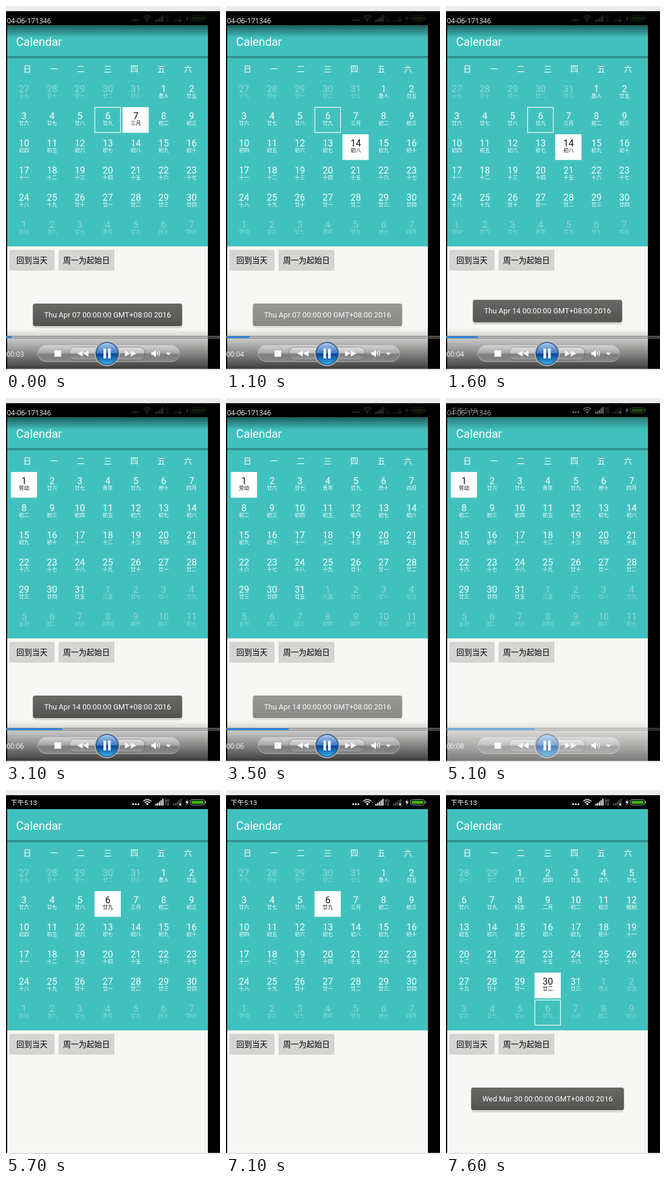
An HTML page for the animation above (8 s loop, 371 by 630 pixels).

```html
<!DOCTYPE html>
<html lang="zh-CN">
<head>
<meta charset="utf-8">
<style>
html, body { margin: 0; width: 100%; height: 100%; overflow: hidden; background: #000; }
svg { display: block; width: 371px; height: 630px; font-family: Roboto, "Noto Sans CJK SC", "Noto Sans CJK", sans-serif; }
.mid { text-anchor: middle; }
.player { font: 12px "Open Sans", sans-serif; fill: #fff; }
</style>
</head>
<body>
<svg viewBox="0 0 371 630">
  <defs>
    <linearGradient id="topShade" x2="0" y2="1">
      <stop offset="0" stop-opacity=".9"/><stop offset=".35" stop-opacity=".8"/>
      <stop offset=".55" stop-opacity=".5"/><stop offset="1" stop-opacity="0"/>
    </linearGradient>
    <linearGradient id="lowShade" x2="0" y2="1">
      <stop offset="0" stop-opacity="0"/><stop offset=".25" stop-opacity=".18"/><stop offset="1" stop-opacity=".75"/>
    </linearGradient>
    <linearGradient id="barFill" x2="0" y2="1">
      <stop offset="0" stop-color="#fff" stop-opacity=".45"/><stop offset=".48" stop-color="#fff" stop-opacity=".25"/>
      <stop offset=".52" stop-color="#777" stop-opacity=".35"/><stop offset="1" stop-color="#bbb" stop-opacity=".45"/>
    </linearGradient>
    <linearGradient id="ball" x2="0" y2="1">
      <stop offset="0" stop-color="#a9c8ec"/><stop offset=".48" stop-color="#3f7cc8"/>
      <stop offset=".52" stop-color="#0b3f94"/><stop offset="1" stop-color="#2fb4f0"/>
    </linearGradient>
    <linearGradient id="toastFill" x2="0" y2="1">
      <stop offset="0" stop-color="#686866"/><stop offset="1" stop-color="#545452"/>
    </linearGradient>
    <linearGradient id="drop" x2="0" y2="1">
      <stop offset="0" stop-opacity=".4"/><stop offset="1" stop-opacity="0"/>
    </linearGradient>
    <clipPath id="view"><rect x="2" y="88" width="348" height="328"/></clipPath>
  </defs>

  <rect width="371" height="9" fill="#ececec"/>
  <rect x="2" y="33" width="348" height="595" fill="#f7f7f5"/>
  <rect y="628" width="371" height="2" fill="#dfe0ea"/>

  <!-- status bar -->
  <g fill="#fff">
    <text x="8" y="25.5" font-size="11.7">下午5:13</text>
    <circle cx="220.5" cy="24.5" r="1.6"/><circle cx="225" cy="24.5" r="1.6"/><circle cx="229.500" cy="24.5" r="1.6"/>
    <path d="M238 19.500q7-6 14 0M240.500 22q4.500-4 9 0" fill="none" stroke="#fff" stroke-width="1.600"/>
    <path d="M242.500 23.800q2.500-2 5 0l-2.500 3z"/>
    <path id="bars" d="M259 24h2v3h-2zM262 22.500h2v4.500h-2zM265 20.500h2v6.500h-2zM268 18h2v9h-2zM271 15.500h2v11.500h-2z"/>
    <use href="#bars" x="31" opacity=".35"/>
    <path d="M300 23l4 4m0-4l-4 4" stroke="#fff" stroke-width="1"/>
    <g font-size="6.5" fill="#bbb"><text x="275" y="20.500">4G</text><text x="275" y="27">1X</text></g>
    <path d="M315 16l-4 6h2.500l-1.500 5 4.500-6.500h-2.500z"/>
    <rect x="319.500" y="16.500" width="25" height="9.500" rx="4" fill="none" stroke="#aaa"/>
    <rect x="321.500" y="18.500" width="21" height="5.500" rx="2.500" fill="#3fae14"/>
    <rect x="345" y="19.500" width="1.500" height="3.500" fill="#aaa"/>
  </g>

  <!-- app -->
  <rect x="2" y="33" width="348" height="383" fill="#41c1be"/>
  <rect x="2" y="87" width="348" height="5" fill="url(#drop)"/>
  <text x="17.500" y="69" font-size="20" fill="#fff">Calendar</text>
  <g id="week" class="mid" font-size="14" fill="#fff"></g>
  <g clip-path="url(#view)"><g id="pages" class="mid"></g></g>
  <g class="mid" font-size="13.5">
    <g fill="#b8b8b6" opacity=".6"><rect x="6" y="423" width="78" height="35" rx="2"/><rect x="91" y="423" width="97" height="35" rx="2"/></g>
    <rect id="today" x="6" y="422" width="77.500" height="35" rx="2"/>
    <rect x="91" y="422" width="97" height="35" rx="2" fill="#d4d4d2"/>
    <text x="45" y="444.500">回到当天</text><text x="139.500" y="444.500">周一为起始日</text>
  </g>

  <g id="toast">
    <rect id="toastShade" y="519" height="39" rx="5" opacity=".12"/>
    <rect id="toastBox" y="515" height="39" rx="4" fill="url(#toastFill)"/>
    <text id="toastText" class="mid" x="176" y="538.500" font-size="13" fill="#fff"></text>
  </g>

  <!-- player overlay -->
  <g id="overlay">
    <rect y="9" width="371" height="46" fill="url(#topShade)"/>
    <text class="player" x="78" y="29.500" text-anchor="end">04-06-171346</text>
    <rect y="558" width="371" height="70" fill="url(#lowShade)"/>
    <rect x="-2" y="571.500" width="375" height="3.500" fill="#999" fill-opacity=".35" stroke="#777" stroke-width="1"/>
    <rect id="progress" y="572" height="2.500" fill="#1c86f2"/>
    <text id="clock" class="player" x="0.500" y="606.500"></text>
    <rect x="55.500" y="587.500" width="245" height="28" rx="14" fill="url(#barFill)" stroke="#ddd" stroke-opacity=".6"/>
    <rect x="109.500" y="590.500" width="131" height="22" rx="9" fill="url(#barFill)" stroke="#555" stroke-opacity=".55"/>
    <g fill="#fff">
      <rect x="84" y="596" width="11.500" height="11" rx="1"/>
      <path d="M133 596.500v10l-9.500-5zM143 596.500v10l-9.500-5z"/>
      <path d="M206.500 596.500v10l9.500-5zM216.500 596.500v10l9.500-5z"/>
      <path d="M252 599h3l5-4v13l-5-4h-3z"/>
      <path d="M262 598.500q2 3 0 6M264.500 596.500q3.500 5 0 10" fill="none" stroke="#fff" stroke-width="1.200"/>
      <path d="M277 600h9l-4.500 4.500z"/>
    </g>
    <circle cx="175.300" cy="601.500" r="21.500" fill="#8b9299" stroke="#ddd" stroke-opacity=".7"/>
    <circle cx="175.300" cy="601.500" r="19" fill="url(#ball)" stroke="#173a70"/>
    <path d="M169 593h4.500v17h-4.500zM177 593h4.500v17h-4.500z" fill="#fff"/>
  </g>
</svg>
<script>
const $ = id => document.getElementById(id);
const LOOP = 8000, DAY = 864e5, PAGE = 348;
const utc = (m, d) => Date.UTC(2016, m - 1, d);

const lunarMonths = [[2, 8, '正月'], [3, 9, '二月'], [4, 7, '三月'], [5, 7, '四月'], [6, 5, '五月'], [7, 4, '六月']];
const feasts = { '3-8': '妇女', '3-12': '植树', '4-1': '愚人', '5-1': '劳动', '5-4': '青年', '6-1': '儿童', '6-9': '端午', '7-1': '建党' };

function lunar(time, m, d) {
  if (feasts[m + '-' + d]) return feasts[m + '-' + d];
  const [lm, ld, name] = lunarMonths.filter(s => utc(s[0], s[1]) <= time).pop();
  const n = (time - utc(lm, ld)) / DAY + 1;
  if (n === 1) return name;
  return n % 10 ? '初十廿'[n / 10 | 0] + '一二三四五六七八九'[n % 10 - 1] : ' 初廿卅'[n / 10] + '十';
}

function page(month, selected, shift) {
  const first = utc(month, 1), start = first - new Date(first).getUTCDay() * DAY;
  let out = `<g transform="translate(${shift.toFixed(1)} 0)">`;
  for (let i = 0; i < 42; i++) {
    const time = start + i * DAY, date = new Date(time);
    const m = date.getUTCMonth() + 1, d = date.getUTCDate();
    const x = 31.3 + i % 7 * 48.4, y = 149 + (i / 7 | 0) * 47;
    const on = m === month && d === selected;
    if (on) out += `<rect x="${x - 23}" y="${y - 21}" width="45.500" height="44.500" fill="#fff"/>`;
    else if (m === 4 && d === 6) out += `<rect x="${x - 22.5}" y="${y - 20.5}" width="44.500" height="43.500" fill="none" stroke="#fff" stroke-width="1.200"/>`;
    out += `<g fill="${on ? '#111' : '#fff'}" opacity="${m === month ? 1 : .42}"><text x="${x}" y="${y}" font-size="16">${d}</text>` +
      `<text x="${x}" y="${y + 10.3}" font-size="9">${lunar(time, m, d)}</text></g>`;
  }
  return out + '</g>';
}

// start, duration, month left, month entered, day selected on arrival
const slides = [[1500, 400, 4, 5, 1], [3500, 400, 5, 6, 1], [4500, 400, 6, 5, 1], [5300, 400, 5, 4, 6], [7100, 300, 4, 3, 30]];
const toasts = [[-1000, 1300, 'Thu Apr 07'], [1400, 3700, 'Thu Apr 14'], [7300, 9000, 'Wed Mar 30']];

const clamp = v => Math.max(0, Math.min(1, v));
const ease = p => p < .5 ? .5 * (2 * p) ** 3.8 : 1 - .5 * (2 - 2 * p) ** 3.8;

function drawPages(t) {
  let month = 4, day = t < 700 ? 7 : 14, html;
  for (const [start, dur, from, to, pick] of slides) {
    if (t <= start) break;
    if (t < start + dur) {
      const dir = Math.sign(to - from), move = ease((t - start) / dur) * PAGE;
      html = page(from, day, -dir * move) + page(to, 0, dir * (PAGE - move));
      break;
    }
    month = to;
    day = pick;
  }
  $('pages').innerHTML = html || page(month, day, 0);
}

function drawToast(t) {
  const live = toasts.find(([a, b]) => t >= a && t < b);
  $('toast').setAttribute('opacity', live ? Math.min(clamp((t - live[0]) / 200), clamp((live[1] - t) / 300)) : 0);
  if (!live) return;
  const k = (t - live[0]) / 100;
  const rise = k < 3 ? 40 * Math.exp(-.9 * k) * Math.cos(Math.PI * k / 2) : 0;
  $('toast').setAttribute('transform', `translate(0 ${rise.toFixed(1)})`);
  $('toastText').textContent = live[2] + ' 00:00:00 GMT+08:00 2016';
  const w = $('toastText').getComputedTextLength() + 39;
  for (const id of ['toastBox', 'toastShade']) {
    $(id).setAttribute('x', 176 - w / 2);
    $(id).setAttribute('width', w);
  }
}

function draw(t) {
  drawPages(t);
  drawToast(t);
  $('today').setAttribute('fill', t >= 5200 && t < 5500 ? '#bdbdbb' : '#d4d4d2');
  $('overlay').setAttribute('opacity', clamp(1 - (t - 5000) / 300));
  $('progress').setAttribute('width', 10 + t * .0282);
  $('clock').textContent = '00:0' + Math.min(8, 3 + Math.floor(t / 1000));
}

$('week').innerHTML = [...'日一二三四五六'].map((c, i) => `<text x="${37 + i * 46.4}" y="114">${c}</text>`).join('');

let last = -1;
const origin = performance.now();
function tick() {
  const t = Math.floor((performance.now() - origin) % LOOP / 100) * 100;
  if (t !== last) draw(last = t);
  requestAnimationFrame(tick);
}
tick();
</script>
</body>
</html>
```
